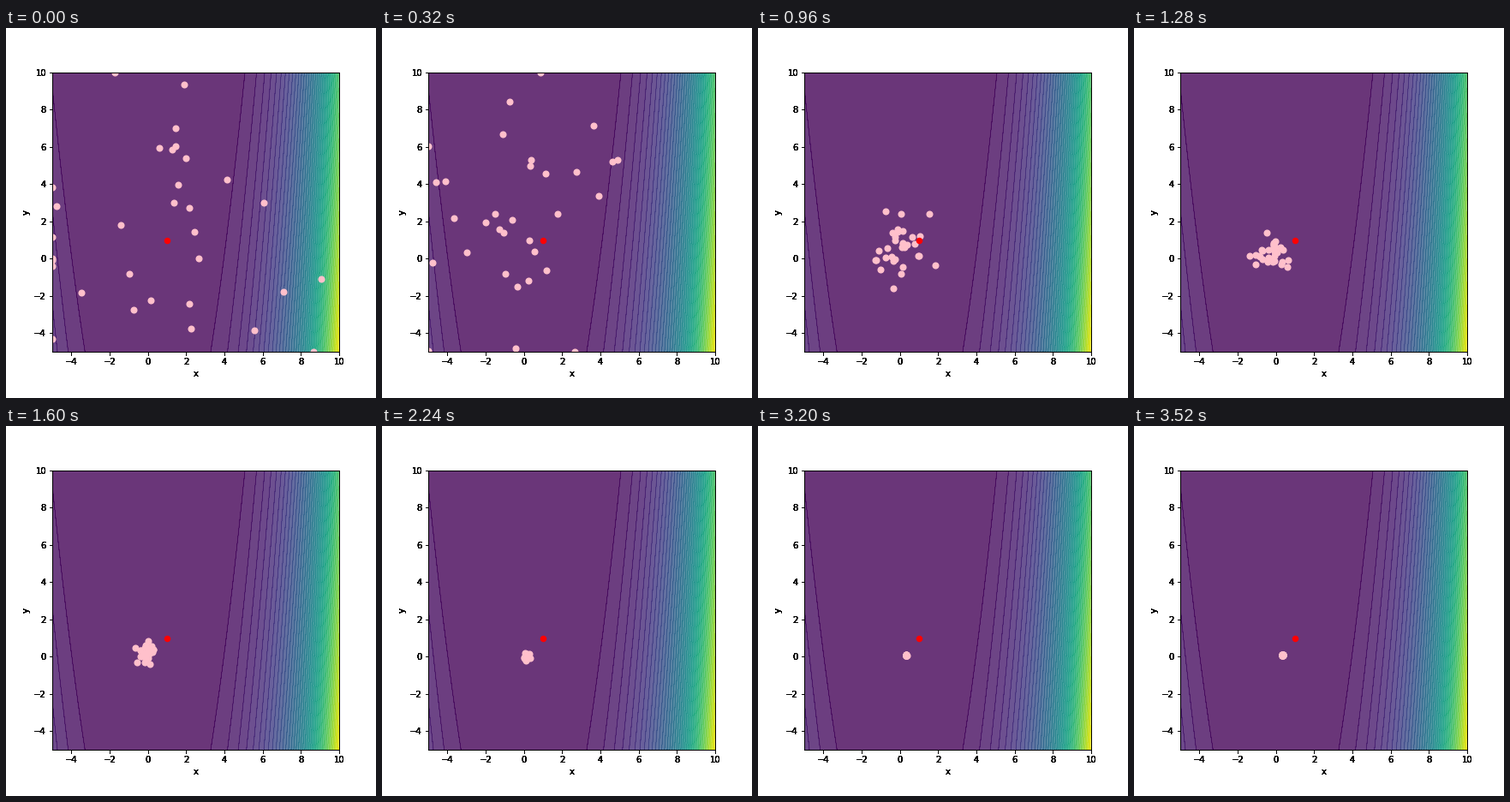
Recreate the animation shown at these times as a matplotlib script. Size 432 by 432 pixels, loop 8.16 s.

```python
import numpy as np
import matplotlib.pyplot as plt
from matplotlib.animation import FuncAnimation

plt.rcParams.update({"font.family": "DejaVu Sans", "font.size": 10})

LOW, HIGH = -5, 10
STEP_MS, FRAMES = 160, 51
COUNT = 32
SWING = .8  # radians each particle swings per step

# Swarm centre and spread at a few steps of the search.
STEPS = [0, 2, 6, 10, 14, 17, 22]
CENTRE_X = [1.6, .2, -.15, -.05, .13, .3, .35]
CENTRE_Y = [2.4, 2.7, .55, .2, 0, .04, .085]
SPREAD = [5.2, 3.8, .95, .28, .09, .025, .008]

rng = np.random.default_rng(7)
swing_a, swing_b = rng.normal(size=(2, COUNT, 2))


def swarm(i):
    """Particles swing around a moving centre while the spread decays."""
    k = min(i, STEPS[-1])
    centre = np.interp(k, STEPS, CENTRE_X), np.interp(k, STEPS, CENTRE_Y)
    spread = np.exp(np.interp(k, STEPS, np.log(SPREAD)))
    swing = swing_a * np.cos(SWING * k) + swing_b * np.sin(SWING * k)
    return np.clip(centre + spread * swing, LOW, HIGH)


def style(ax):
    ticks = np.arange(-4, HIGH + 1, 2)
    ax.set(xlim=(LOW, HIGH), ylim=(LOW, HIGH), xticks=ticks, yticks=ticks,
           xlabel="x", ylabel="y")


fig = plt.figure(figsize=(6, 6), dpi=72, facecolor="white")
fig.subplots_adjust(left=.125, right=.9, bottom=.125, top=.88)
ax = fig.add_subplot()
style(ax)

# Rosenbrock valley
grid = np.linspace(LOW, HIGH, 200)
X, Y = np.meshgrid(grid, grid)
Z = (1 - X) ** 2 + 100 * (Y - X ** 2) ** 2
levels = np.arange(0, 1.13e6, 25000)
ax.contourf(X, Y, Z, levels, cmap="viridis", alpha=.8)
ax.contour(X, Y, Z, levels[1:], cmap="viridis", linewidths=.7,
           vmin=0, vmax=levels[-1])

dots = ax.scatter(*swarm(0).T, s=43, c="pink", linewidths=1.5, zorder=2.2)
ax.scatter(1, 1, s=36, c="red", linewidths=1.5, zorder=2.3)

# Stacked clear axes harden the edges of the text.
for _ in range(6):
    cover = fig.add_axes(ax.get_position(), facecolor="none")
    style(cover)


def draw(i):
    dots.set_offsets(swarm(i))
    return dots,


anim = FuncAnimation(fig, draw, frames=FRAMES, interval=STEP_MS,
                     repeat=True, repeat_delay=0)
plt.show()
```
